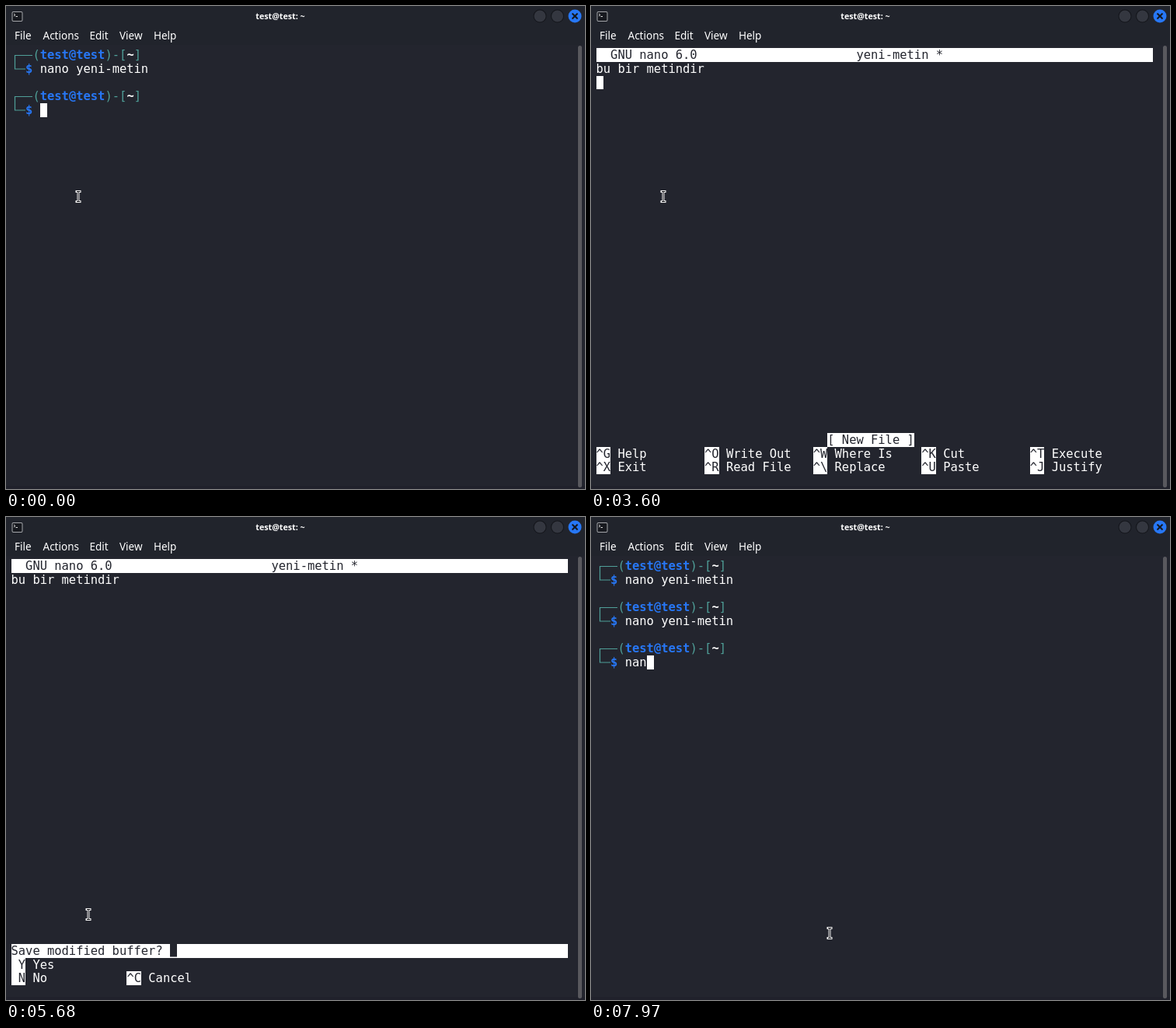
Animation, 745 px wide and 621 px high, one loop 8000 ms. Source, as an HTML page with a canvas:

```html
<!DOCTYPE html>
<html lang="tr">
<head>
<meta charset="utf-8">
<title>nano</title>
<style>
  html, body { margin: 0; width: 100%; height: 100%; overflow: hidden; background: #23252e; }
  canvas { display: block; }
</style>
</head>
<body>
<canvas id="stage" width="745" height="621"></canvas>
<script>
const ctx = document.getElementById('stage').getContext('2d');
const LOOP = 8000;
const CELL_W = 9.305, CELL_H = 17.67, LEFT = 6.5, TOP = 54.3, COLS = 77;
const BG = '#23252e', WHITE = '#fff', TEAL = '#4f9f98', BLUE = '#2777f5';
const MONO = '15.45px "DejaVu Sans Mono", monospace';
const COMMAND = 'nano yeni-metin', ACCOUNT = 'test@test';

const colX = col => LEFT + col * CELL_W;
const rowY = row => TOP + row * CELL_H;

function text(str, x, y, font, color = WHITE, align = 'left') {
  ctx.font = font;
  ctx.fillStyle = color;
  ctx.textAlign = align;
  ctx.fillText(str, x, y);
}

function box(x, y, w, h, radius, color) {
  ctx.fillStyle = color;
  ctx.beginPath();
  ctx.roundRect(x, y, w, h, radius);
  ctx.fill();
}

function line(points, color, width) {
  ctx.strokeStyle = color;
  ctx.lineWidth = width;
  ctx.beginPath();
  points.forEach(([x, y]) => ctx.lineTo(x, y));
  ctx.stroke();
}

function disc(x, y, r, color) {
  ctx.fillStyle = color;
  ctx.beginPath();
  ctx.arc(x, y, r, 0, 7);
  ctx.fill();
}

// Terminal grid
function cells(col, row, count, color = WHITE) {
  const x = Math.round(colX(col)), y = Math.round(rowY(row));
  box(x, y, Math.round(colX(col + count)) - x, Math.round(rowY(row + 1)) - y, 0, color);
}

function put(str, col, row, color = WHITE, weight = '') {
  text(str, colX(col), rowY(row) + 13.8, weight + ' ' + MONO, color);
}

function putInverse(str, col, row, width = str.length) {
  cells(col, row, width);
  put(str, col, row, BG);
}

function typed(str, t, start, end) {
  if (t < start) return '';
  const step = (end - start) / (str.length - 1);
  return str.slice(0, 1 + Math.floor((t - start) / step + 0.01));
}

function drawWindow() {
  box(0, 0, 745, 621, 0, BG);
  box(0, 0, 745, 50, 0, '#21242c');
  box(0, 617, 745, 4, 0, '#20212b');
  box(736, 51, 5, 568, 2.5, '#59595e');

  box(7.5, 7, 14, 13, 2, '#a4a6aa');
  box(8.5, 8, 12, 11, 1, '#17191f');
  line([[10, 10], [12, 11.5], [10, 13]], '#ddd', 1);
  line([[12.5, 13.5], [15, 13.5]], '#ddd', 1);

  text(ACCOUNT + ': ~', 353, 17, '600 10.7px "Noto Sans", sans-serif', WHITE, 'center');
  const menus = { File: 11, Actions: 47.5, Edit: 107.5, View: 146, Help: 190 };
  for (const name in menus) text(name, menus[name], 43, '500 13.5px "Noto Sans", sans-serif');

  for (const x of [687, 709.5]) {
    disc(x, 13, 8.5, '#14161b');
    disc(x, 13, 7.5, '#343740');
  }
  disc(732, 13, 8.5, BLUE);
  line([[728.5, 9.5], [735.5, 16.5]], '#15171d', 2);
  line([[735.5, 9.5], [728.5, 16.5]], '#15171d', 2);
}

function drawPrompt(row, command, { ready = true, cursor = false } = {}) {
  const y = Math.round(rowY(row)) + 9.5, x = 11.5;
  const corner = [[x, y + 9], [x, y], [34, y]];
  if (ready) corner.unshift([25, y + 17.5], [x, y + 17.5]);
  line(corner, TEAL, 1.2);
  put('(', 3, row, TEAL);
  put(ACCOUNT, 4, row, BLUE, 'bold');
  put(')-[', 13, row, TEAL);
  put('~', 16, row, WHITE, 'bold');
  put(']', 17, row, TEAL);
  if (!ready) return;
  put('$', 2, row + 1, BLUE, 'bold');
  put(command, 4, row + 1);
  if (cursor) cells(4 + command.length, row + 1, 1);
}

function drawShell(t) {
  drawPrompt(0, COMMAND);
  if (t < 1950) {
    const command = typed(COMMAND.slice(0, 11), t, 680, 1480) + typed(COMMAND.slice(11), t, 1550, 1820);
    drawPrompt(3, command, { cursor: true });
  } else {
    drawPrompt(3, COMMAND);
    drawPrompt(6, typed('nan', t, 7840, 7970), { ready: t >= 7840, cursor: true });
  }
}

function drawShortcuts(rows, spacing) {
  rows.forEach((items, r) => items.forEach(([key, label], i) => {
    putInverse(key, i * spacing, 29 + r);
    put(label, i * spacing + key.length + 1, 29 + r);
  }));
}

function drawQuestion(str) {
  putInverse(str, 0, 28, COLS);
  box(Math.round(colX(str.length)), Math.round(rowY(28)), 9, 16.5, 0, BG);
}

function drawEditor(t) {
  putInverse('  GNU nano 6.0', 0, 0, COLS);
  put('yeni-metin' + (t >= 2350 ? ' *' : ''), 36, 0, BG);
  const body = typed('bu bir ', t, 2350, 2630) + typed('metindir', t, 2830, 3330);
  put(body, 0, 1);

  if (t < 4200) {
    if (t < 3600) cells(body.length, 1, 1);
    else cells(0, 2, 1);
    putInverse('[ New File ]', 32, 28);
    drawShortcuts([
      [['^G', 'Help'], ['^O', 'Write Out'], ['^W', 'Where Is'], ['^K', 'Cut'], ['^T', 'Execute']],
      [['^X', 'Exit'], ['^R', 'Read File'], ['^\\', 'Replace'], ['^U', 'Paste'], ['^J', 'Justify']]
    ], 15);
  } else if (t < 6160) {
    drawQuestion('Save modified buffer? ');
    drawShortcuts([[[' Y', 'Yes']], [[' N', 'No'], ['^C', 'Cancel']]], 16);
  } else {
    drawQuestion('File Name to Write: yeni-metin');
    drawShortcuts([
      [['^G', 'Help'], ['M-D', 'DOS Format'], ['M-A', 'Append'], ['M-B', 'Backup File']],
      [['^C', 'Cancel'], ['M-M', 'Mac Format'], ['M-P', 'Prepend'], ['^T', 'Browse']]
    ], 19);
  }
}

function drawKey(label, x, w, size, baseline) {
  const y = 405, h = 91;
  box(x, y, w, h, 9, '#08090b');
  box(x + 2, y + 2, w - 4, h - 4, 7, '#92938f');
  box(x + 3.5, y + 3, w - 7, h - 6.5, 6, '#b0b1b2');
  box(x + 5, y + 5, w - 10, h - 10, 5, '#bcbdc1');
  text(label, x + w / 2, baseline, size + 'px "Liberation Sans", Arial, sans-serif', '#000', 'center');
}

function drawKeys(t) {
  if (t >= 3870 && t < 4530) {
    drawKey('Ctrl', 209.5, 139, 63, 472);
    line([[371, 450], [420, 450]], '#000', 7);
    line([[395.5, 426], [395.5, 474]], '#000', 7);
    drawKey('X', 442.5, 92, 64, 473);
  } else if (t >= 5830 && t < 6490) {
    drawKey('Y', 325.5, 92, 64, 473);
  } else if (t >= 7090 && t < 7840) {
    drawKey('Enter', 279.5, 185, 55, 470);
  }
}

// Pointer stops: time, x, y
const STOPS = [
  [0, 93, 245], [4530, 93, 245], [4800, 65, 580], [4950, 65, 580],
  [5270, 15, 577], [5680, 106, 511], [6200, 106, 511], [6830, 307, 535], [LOOP, 307, 535]
];

function drawPointer(t) {
  const i = STOPS.findIndex(stop => stop[0] > t);
  const [t0, x0, y0] = STOPS[i - 1], [t1, x1, y1] = STOPS[i];
  const p = (t - t0) / (t1 - t0), ease = p * p * (3 - 2 * p);
  const x = Math.round(x0 + (x1 - x0) * ease), y = Math.round(y0 + (y1 - y0) * ease);
  ctx.lineCap = 'square';
  for (const [color, width] of [['#f4f4f4', 3], ['#14151a', 1]]) {
    line([[x - 2, y - 6.5], [x + 2, y - 6.5]], color, width);
    line([[x, y - 6.5], [x, y + 6.5]], color, width);
    line([[x - 2, y + 6.5], [x + 2, y + 6.5]], color, width);
  }
  ctx.lineCap = 'butt';
}

function draw() {
  const t = performance.now() % LOOP;
  drawWindow();
  if (t < 1950 || t >= 7640) drawShell(t);
  else drawEditor(t);
  drawKeys(t);
  drawPointer(t);
  requestAnimationFrame(draw);
}
draw();
</script>
</body>
</html>
```
